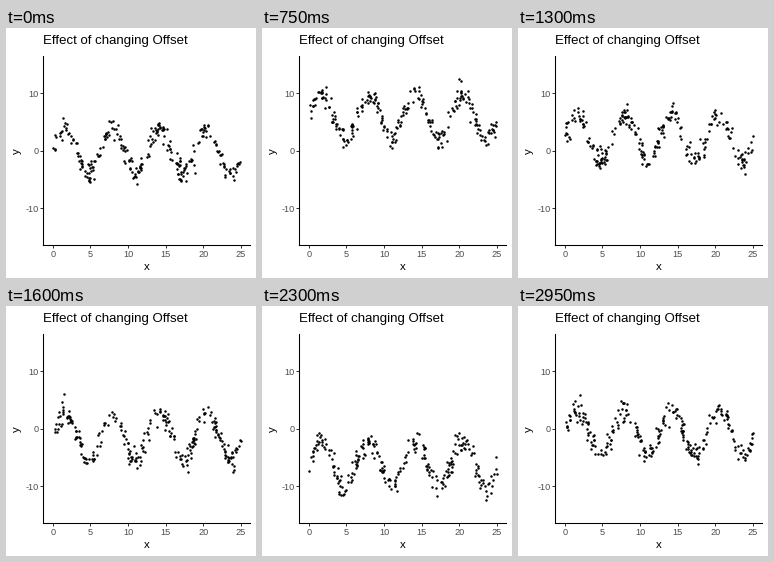
These frames come from a looping animation (250x250 px, 3000 ms). A matplotlib script:

```python
import numpy as np
import matplotlib.pyplot as plt
from matplotlib.animation import FuncAnimation

SIZE, DPI = 250, 100
FRAMES, INTERVAL = 60, 50
POINTS = 250
AMPLITUDE, MAX_OFFSET, NOISE = 4, 6, 1
LEFT, RIGHT, TOP, BOTTOM = 37.4, 244.5, 27.9, 217.4
GREY = "#4d4d4d"

plt.rcParams["font.family"] = "Liberation Sans"


def pt(px):
    """Convert pixels to points."""
    return px * 72 / DPI


def label(x, y, text, px, **kwargs):
    """Write text at a pixel position measured from the top left."""
    return fig.text(x / SIZE, 1 - y / SIZE, text, fontsize=pt(px), **kwargs)


def sample(frame):
    """Noisy sine wave whose offset swings once per loop."""
    rng = np.random.default_rng(1000 + frame)
    offset = MAX_OFFSET * np.sin(2 * np.pi * frame / FRAMES)
    x = rng.uniform(0, 25, POINTS)
    y = AMPLITUDE * np.sin(x) + offset + rng.normal(0, NOISE, POINTS)
    return x, y


fig = plt.figure(figsize=(SIZE / DPI, SIZE / DPI), dpi=DPI, facecolor="white")
ax = fig.add_axes([LEFT / SIZE, 1 - BOTTOM / SIZE,
                   (RIGHT - LEFT) / SIZE, (BOTTOM - TOP) / SIZE])
ax.set_xlim(-1.25, 26.25)
ax.set_ylim(-16.5, 16.5)
ax.set_xticks(range(0, 26, 5))
ax.set_yticks([-10, 0, 10], ["-10", "0", "10"])
ax.tick_params(length=pt(2.75), width=pt(1), pad=pt(2.2), color="#333333",
               labelsize=pt(9.2), labelcolor=GREY)
ax.spines[["top", "right"]].set_visible(False)
ax.spines[["left", "bottom"]].set_linewidth(pt(1.07))

label(37, 16, "Effect of changing Offset", 13.2, va="baseline")
label(141, 242, "x", 11.5, ha="center", va="baseline")
label(10.5, 123, "y", 11.5, ha="center", va="center", rotation=90)

dots, = ax.plot([], [], "o", color="black", ms=pt(2.5), mew=0)


def update(frame):
    dots.set_data(*sample(frame))
    return dots,


anim = FuncAnimation(fig, update, frames=FRAMES, interval=INTERVAL,
                     repeat=True, repeat_delay=0)
plt.show()
```
